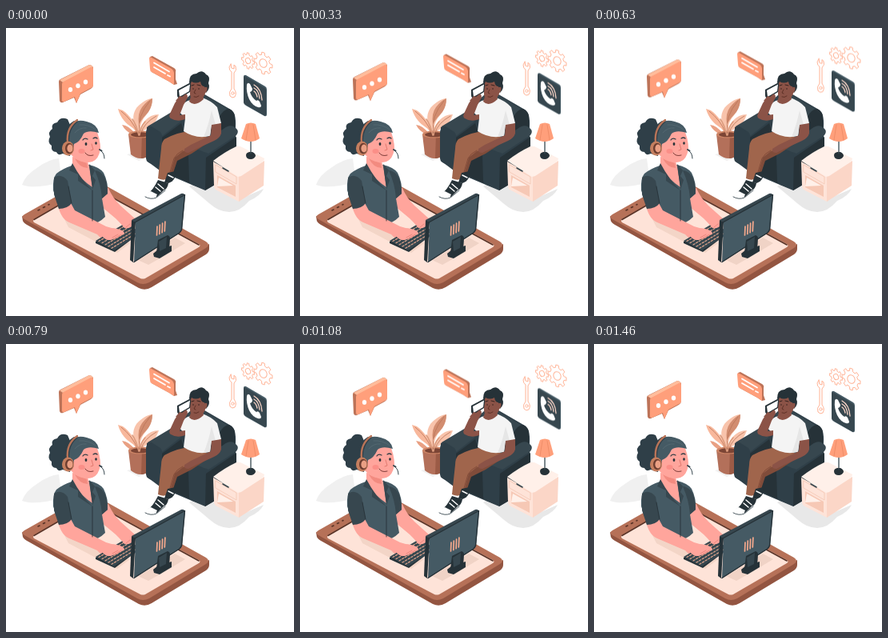
Write an HTML page that moves like this. It is 360 by 360 pixels and loops after 1500 ms.

```html
<!DOCTYPE html>
<html lang="en">
<head>
<meta charset="utf-8">
<title>Support call</title>
<style>
html,body{margin:0;width:100%;height:100%;overflow:hidden;background:#fff}
svg{display:block;width:100vw;height:100vh}
.float{animation:float .75s cubic-bezier(.37,0,.63,1) infinite alternate}
.low{--rise:-6px}
.high{--rise:-7px}
@keyframes float{to{transform:translateY(var(--rise))}}
.ink{fill:#263238}.dark{fill:#2f3f48}.mid{fill:#37474f}.soft{fill:#455a64}
.skin{fill:#ffa59c}.blush{fill:#f28b80}.tan{fill:#8b5347}
.peach{fill:#ff9f7b}.rust{fill:#bd7358}.cream{fill:#fee3d8}.white{fill:#fff}
.line{fill:none;stroke-linecap:round;stroke-linejoin:round}
</style>
</head>
<body>
<svg viewBox="0 0 360 360">
  <g id="shadows" fill="#f0f0f0">
    <path d="M20 196Q24 184 40 174Q54 164 66 163L70 193L50 197Q30 200 20 196Z"/>
    <path fill="#e8e8e8" d="M229 198L247 187L292 214L322 201Q318 210 304 216Q292 230 279 230Q266 230 254 219Z"/>
    <path d="M151 158L166 166L184 158L178 152Z"/>
  </g>

  <g id="plant">
    <path fill="#f8c3ab" d="M166 131C158 119 157 109 163 100C169 93 177 88 183 88C183 97 178 106 172 113Q167 120 168 131Z"/>
    <path fill="#d28d70" d="M166 120Q164 107 170 99Q176 91 183 88Q183 98 178 105Q171 112 166 120Z"/>
    <path fill="#f8b89c" d="M165 132C163 122 156 110 146 103L140 101C143 113 151 120 157 124Q162 127 163 133Z"/>
    <path fill="#f8c3ab" d="M167 132C168 120 177 108 191 108C188 117 183 124 176 126Q170 128 170 134Z"/>
    <path fill="#e9a083" d="M161 132Q154 122 145 121Q149 129 158 133Z"/>
    <path class="line" stroke="#b97458" stroke-width=".8" d="M167 130Q163 111 180 91M164 130Q158 115 144 104M169 131Q172 119 188 110"/>
    <path fill="#b3705a" d="M153 133H182L180 158Q168 168 156 158Z"/>
    <path fill="#9b5b46" d="M170 133H182L180 158Q175 163 169 163Z"/>
    <ellipse cx="167.500" cy="133" rx="14.500" ry="4.500" fill="#cd8566"/>
    <ellipse cx="167.500" cy="133.300" rx="11.500" ry="3" fill="#7c4535"/>
    <path class="line" stroke="#db9a7c" stroke-width="1.600" d="M166 134Q163 121 158 114M167 134Q168 123 174 117"/>
  </g>

  <g id="chair">
    <path class="dark" d="M176 124L207 106L232 82Q240 78 250 84L281 102Q288 106 287 124L288 180L249 203L230 195L204 184L192 178L176 166Z"/>
    <path class="mid" d="M227 87Q238 78 249 85L276 101L267 111L228 91Z"/>
    <path class="ink" d="M267 111Q271 102 279 101Q287 105 286 113V131L267 139Z"/>
    <path class="mid" d="M177 123L207 105Q216 103 219 110L218 117L195 135Q191 128 177 123Z"/>
    <path class="dark" d="M175 130Q176 122 182 123L193 130Q196 133 195 140V177L178 168Q175 166 175 163Z"/>
    <path class="ink" d="M195 137L219 119L232 158V195L195 178Z"/>
    <path class="mid" d="M205 143L240 125L271 138L236 158Z"/>
    <path class="mid" d="M229 157Q231 150 238 148L272 126Q282 118 289 127Q291 130 288 134L253 157Q246 152 229 157Z"/>
    <path class="dark" d="M228 160Q230 151 240 152Q250 154 250 163L249 202L233 196Q229 194 229 191Z"/>
    <path class="ink" d="M250 162L288 136V180L249 203Z"/>
  </g>

  <g id="caller">
    <path fill="#804c3a" d="M211 143Q224 134 247 136L253 143L232 157L214 166L207 187L196 186L199 157Q201 148 211 143Z"/>
    <path fill="#a0654c" d="M198 139Q214 130 235 128L252 137Q244 149 221 154L211 162L204 187Q198 192 190 188L194 151Q194 143 198 139Z"/>
    <path class="line" stroke="#7b4635" stroke-width=".8" d="M221 153Q213 157 210 163L203 187"/>
    <path class="ink" d="M202 181L212 179L211 187Q209 192 203 194L198 193Z"/>
    <path class="ink" d="M190 190L203 194Q202 201 197 203L189 211L177 207Q183 204 190 190Z"/>
    <path class="white" d="M174 210Q176 206 181 204L189 208L187 212Q180 215 174 210Z"/>
    <path class="line" stroke="#fff" stroke-width="1.500" d="M187 199L193 204M190 195L197 201M203 184L209 187"/>
    <path class="line" stroke="#37474f" stroke-width=".9" d="M174 211Q181 215 188 212L199 203"/>
    <path fill="#f4f4f4" d="M227 91L245 87Q257 91 264 99L269 119Q263 123 257 121L255 135Q237 139 222 129L224 113L216 104Q219 95 227 91Z"/>
    <path fill="#e6e6e6" d="M257 103L262 121H257L255 134L247 136Q253 122 257 103Z"/>
    <path class="tan" d="M229 92Q236 99 247 89L245 82L231 86Z"/>
    <path class="tan" d="M219 83Q226 82 227 87L222 96L217 109L224 108V114Q214 118 206 113Q203 111 205 107L211 94Z"/>
    <path class="tan" d="M257 121L269 119V132Q267 138 260 141L238 151L228 156Q222 156 223 151L231 146L256 134Z"/>
    <path class="tan" d="M230 69Q233 62 244 63Q252 68 250 79Q247 90 239 92Q231 91 230 83Z"/>
    <path class="ink" d="M229 68Q229 57 238 57Q245 51 250 58Q256 60 253 69Q256 75 250 81L248 73Q244 73 243 67Q237 70 232 67L230 71Z"/>
    <path class="tan" d="M247 75Q253 71 251 79Q249 82 247 81Z"/>
    <path class="line" stroke="#37231f" stroke-width="1" d="M232 72L235 71M239 71L243 72M234 75.500V76.500M241 75.500V76.500"/>
    <path class="line" stroke="#54291f" stroke-width=".8" d="M237 77L235 81L237 82M235 86Q238 87.500 241 85"/>
    <path class="ink" d="M214 77L229 69Q232 69 231 73L230 80L217 88Q214 87 214 84Z"/>
    <path class="white" d="M216 78L230 70.500L229 79L217 86Z"/>
    <path class="tan" d="M212 91L217 85L220 86L225 82L227 85L220 95Z"/>
  </g>

  <g id="table">
    <path class="cream" d="M259 167L291 185V217L262 202Q260 200 260 197Z"/>
    <path fill="#fbd6c7" d="M291 185L323 166L322 197L291 217Z"/>
    <path fill="#fff0e9" d="M259 166Q273 155 288 148H293L323 163Q323 166 320 168L294 185L290 186Z"/>
    <path fill="#f6c8b5" d="M264 184L287 197V211L264 199Z"/>
    <path fill="#fff0e9" d="M266 187L284 197L264 198Z"/>
    <path class="line" stroke="#f3c3af" stroke-width=".7" d="M262 171L288 186V195L262 180Z"/>
    <path class="line" stroke="#37474f" stroke-width="1.600" d="M271 175L278 179"/>
    <path class="ink" d="M300 159Q300 156 304 155H308Q312 157 312 160Q310 164 306 164Q300 164 300 159Z"/>
    <path class="line" stroke="#37474f" stroke-width="1.300" d="M306 139V157"/>
    <path class="peach" d="M300 120Q306 117 312 120L317 138Q306 146 294 138Z"/>
    <path class="line" stroke="#e98661" stroke-width=".7" d="M303 121L300 140M309 121L312 140"/>
  </g>

  <g id="tablet">
    <path fill="#935541" d="M20 235L21 241Q22 244 28 247L166 325Q174 329 182 324L250 283Q254 280 254 276V270L170 316Z"/>
    <path fill="#b67158" d="M23 233L99 190Q105 186 112 190L250 267Q256 271 250 275L179 318Q171 322 164 318L23 239Q18 236 23 233Z"/>
    <path class="cream" d="M35 239L104 199Q107 198 110 199L241 270Q244 272 241 274L174 313Q171 314 168 313L35 243Q33 241 35 239Z"/>
    <path class="line" stroke="#593327" stroke-width="1.600" d="M35 239.500L104 199.500Q107 198 110 199.500L241 271"/>
    <path class="line" stroke="#593327" stroke-width="1.600" d="M40 228L42 227M46.500 224.500L48.500 223.500M53 221L54 220.500"/>
    <path fill="#f3d5c7" d="M70 233L111 251L155 269L139 281L112 267L78 249Z"/>
  </g>

  <g id="agent">
    <path class="skin" d="M117 202L128 200Q133 212 143 222L162 239Q163 245 155 248L149 250L137 238L119 223Z"/>
    <path class="soft" d="M63 182Q70 176 85 171H104Q117 174 122 181Q128 193 127 207L120 213L124 236Q112 249 92 245L70 231Q65 227 65 220L59 203Q58 188 63 182Z"/>
    <path class="mid" d="M111 178Q122 179 126 194L127 207L120 213Q119 196 111 178Z"/>
    <path class="skin" d="M83 161L101 164L104 173L108 199Q95 191 83 173Z"/>
    <path class="blush" d="M86 163L101 169L102 175Q92 175 86 163Z"/>
    <path class="mid" d="M83 169L79 178L90 183V191L108 203Q94 190 83 169ZM104 170L111 178L108 185L112 190L108 202Z"/>
    <path class="skin" d="M65 222L80 217L86 228L125 248L139 252Q148 254 148 258L139 264L126 265Q119 264 114 258L79 243Q69 239 65 222Z"/>
    <path class="mid" d="M60 187Q69 181 77 191L82 219Q77 226 66 226L60 208Z"/>
    <path class="line" stroke="#263238" stroke-width=".9" d="M78 198L82 219M108 203V241"/>
  </g>

  <g id="head">
    <path class="dark" d="M77 114Q68 110 64 118Q56 119 58 126Q52 130 55 136Q51 143 57 147Q56 155 63 155Q65 160 71 157L80 160L83 128Z"/>
    <path class="skin" d="M82 138L92 122L112 126Q118 138 118 151Q116 164 108 167Q97 170 86 163L78 155Z"/>
    <path class="soft" d="M76 151Q70 134 78 123Q86 113 101 117Q114 120 116 131Q103 127 97 132Q92 143 85 145L84 154Z"/>
    <path class="dark" d="M74 145Q69 126 85 116L90 117Q78 126 79 144Z"/>
    <path class="line" stroke="#596d76" stroke-width=".7" d="M92 121Q103 120 112 127M86 131Q92 124 100 125"/>
    <path class="line" stroke="#b97458" stroke-width="2.400" d="M77 143Q75 125 89 115"/>
    <ellipse cx="77.500" cy="150.500" rx="7.500" ry="9" fill="#c57f5f"/>
    <ellipse cx="79" cy="150.500" rx="5" ry="6.800" fill="#6c3d30"/>
    <ellipse cx="80" cy="150.500" rx="3.600" ry="5" fill="#eaa084"/>
    <path class="line" stroke="#334047" stroke-width="1.300" d="M96 140Q98 137 102 139M109 138Q112 136 114 138"/>
    <ellipse cx="100" cy="145" rx="1.400" ry="1.900" class="ink"/>
    <ellipse cx="112.500" cy="144" rx="1.300" ry="1.800" class="ink"/>
    <path class="line" stroke="#e07a70" stroke-width="1" d="M107 145L109 152L106 153"/>
    <path class="line" stroke="#7d3b38" stroke-width="1" d="M99 156Q102 161 109 159"/>
    <ellipse cx="94.500" cy="154" rx="4" ry="3" fill="#fb8f88"/>
    <path class="line" stroke="#37474f" stroke-width="1" d="M123 163Q123 156 118 153"/>
    <path class="line" stroke="#37474f" stroke-width="2" d="M117 152L119.500 153.500"/>
  </g>

  <g id="keyboard">
    <path class="ink" d="M112 267L150 245L160 250V262L136 280L112 269Z"/>
    <path class="mid" d="M112 266L149 244L170 256L135 278Z"/>
    <path class="line" stroke="#e0a48c" stroke-width="1.200" stroke-dasharray="2.300 1.900" stroke-linecap="butt" d="M116 266.500L150 246.500M120 268.700L154 248.700M124 270.900L158 250.900M128 273.100L160 254M132 275.300L162 257"/>
    <path class="skin" d="M119 258Q128 248 139 251Q148 253 148 257L139 262L131 265Q123 266 119 258ZM140 240L155 236Q162 240 160 246Q155 251 148 250Z"/>
    <path class="line" stroke="#e57f76" stroke-width=".8" d="M133 262L140 258M136 263L144 258M150 249L155 245"/>
  </g>

  <g id="monitor">
    <path fill="#f0d3c6" d="M165 290L184 279L211 262L224 269L194 287L178 296Z"/>
    <path class="mid" d="M157 240L219 207Q222 206 224 209L162 244Z"/>
    <path class="ink" d="M157 240L162 243L159 293L155 290Z"/>
    <path class="soft" d="M162 243L224 208L220 252Q219 255 216 257L160 293Z"/>
    <path class="line" stroke="#263238" stroke-width="1.400" d="M161 243L223.500 208.500L219.500 252Q219 254 216 256.500L160 292.500"/>
    <path class="ink" d="M184 282L190 277L207 272V279L192 288L185 286Z"/>
    <path class="ink" d="M190 265L202 259Q205 260 205 263L204 278L192 285L188 281Z"/>
    <path class="mid" d="M191 267L201 261L200 275L192 279Z"/>
    <path class="line" stroke="#f6a98d" stroke-width="1.700" stroke-linecap="butt" d="M189 248L188.500 259M192.300 246L191.800 257.500M195.600 244L195.100 255.700M198.900 242L198.300 254"/>
  </g>

  <g class="float high">
    <path class="rust" d="M66 67Q66 65 68 64L104 46Q107 46 109 49V71Q109 74 106 76L93 83L88 94L85 87L71 93Q68 94 67 91Z"/>
    <path fill="#ffbd9c" d="M67 65L104 46Q107 46 109 49L71 68Z"/>
    <path class="peach" d="M70 70Q70 68 72 67L106 49Q109 48 109 51V71Q109 74 106 75L93 82L88 94L86 86L73 92Q70 93 70 90Z"/>
    <g class="white"><ellipse cx="80.500" cy="77" rx="2.700" ry="3"/><ellipse cx="90" cy="72.300" rx="2.700" ry="3"/><ellipse cx="99.500" cy="67.600" rx="2.700" ry="3"/></g>
  </g>

  <g class="float low">
    <path class="rust" d="M180 36L183 35L210 50Q213 52 212 55V64L214 70L210 71L204 67L182 55Z"/>
    <path class="peach" d="M179 38Q179 35 182 37L207 51Q210 53 210 56V71L204 67L182 55Q180 54 180 51Z"/>
    <path class="line" stroke="#fff" stroke-width="1.800" d="M185 43.500L204 54.500M185 49L199 57M202 59L205 60.500"/>
  </g>

  <g class="float high line" stroke="#ffb295" stroke-width="1">
    <path d="M281 45L279 49Q279 53 282 55V76Q278 80 280 85L283 87L286 86Q289 81 285 76V56Q289 53 287 48L285 46V51L282 50Z"/>
    <circle cx="283.500" cy="81.500" r="1.700"/>
    <path id="big"/><ellipse cx="321.500" cy="44" rx="4.500" ry="5.500" transform="rotate(-25 321.500 44)"/>
    <path id="small"/><ellipse cx="302.500" cy="41" rx="3" ry="3.700" transform="rotate(-25 302.500 41)"/>
  </g>

  <g class="float low">
    <path class="soft" d="M297 61Q297 58 300 59L324 73Q326 74 326 77V108Q326 111 323 110L300 97Q297 95 297 92Z"/>
    <path class="mid" d="M297 62Q297 59 300 61L322 74Q325 75 325 78V108Q325 111 322 109L300 96Q297 95 297 92Z"/>
    <path class="white" d="M301 71Q302 67 305 70L308 76Q308 79 305 80Q307 87 313 91Q315 89 317 92L319 97Q319 100 315 99Q308 97 304 89Q300 80 301 71Z"/>
    <path class="line" stroke="#ffd9cb" stroke-width="1.300" d="M310 79Q313 81 314 86M310 75Q316 78 317 88M310 71Q319 76 320 90"/>
  </g>
</svg>
<script>
// Closed outline of a toothed wheel, skewed to the isometric wall.
function gear(id, cx, cy, rx, ry, teeth) {
  const pts = [];
  for (let i = 0; i < teeth; i++) {
    for (const [turn, reach] of [[-.3, .76], [-.19, 1], [.19, 1], [.3, .76]]) {
      const a = (i + turn) / teeth * 2 * Math.PI;
      const x = rx * reach * Math.cos(a);
      const y = ry * reach * Math.sin(a) + x * .35;
      pts.push((cx + x).toFixed(1) + ' ' + (cy + y).toFixed(1));
    }
  }
  document.getElementById(id).setAttribute('d', 'M' + pts.join('L') + 'Z');
}
gear('big', 321.5, 44, 11.5, 13.5, 8);
gear('small', 302.5, 41, 8, 10, 8);
</script>
</body>
</html>
```
